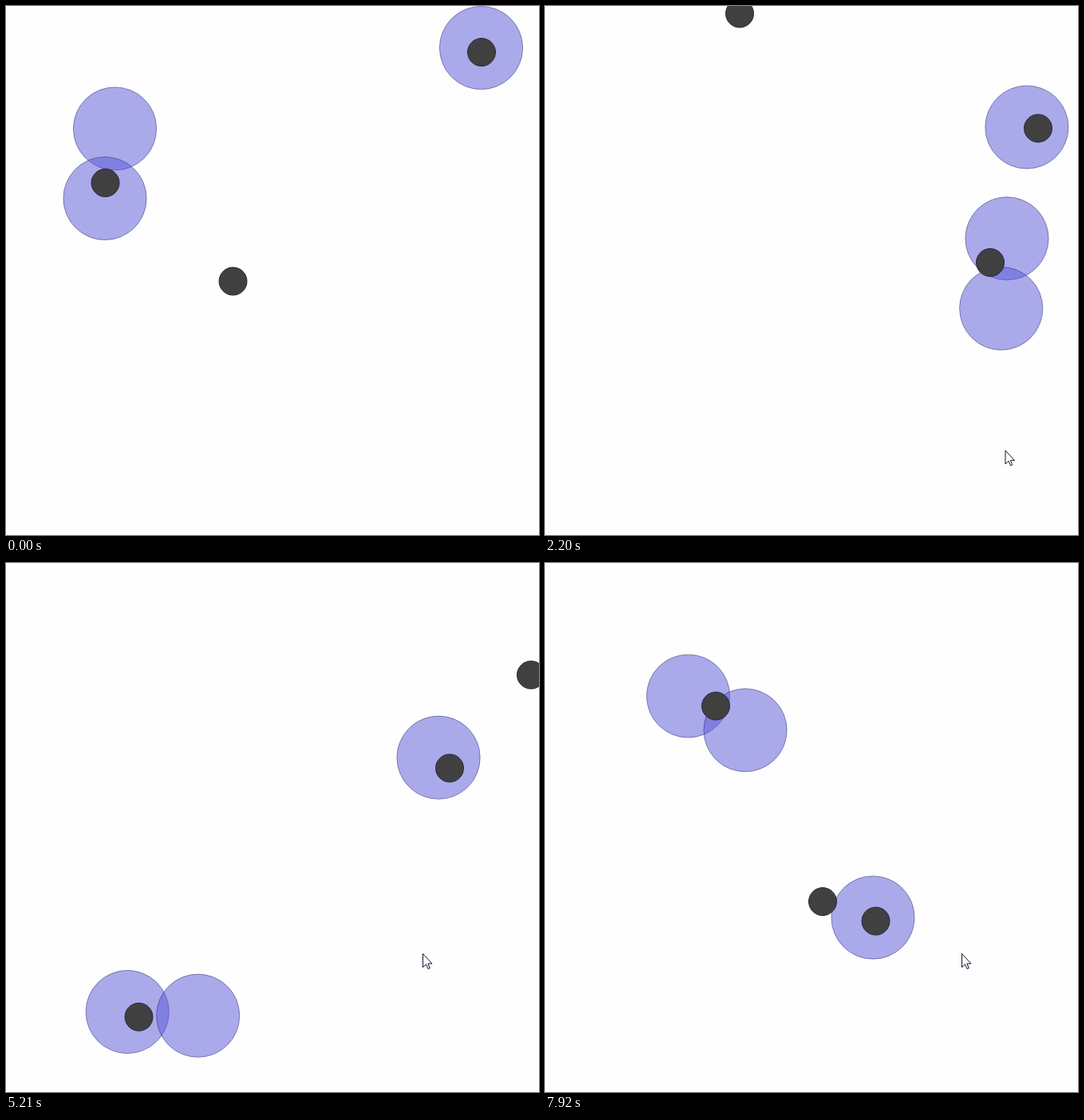
Animation, 668 px wide and 664 px high, one loop 7.99 s. Source, as an HTML page with a canvas:

```html
<!DOCTYPE html>
<html lang="en">
<head>
<meta charset="utf-8">
<title>Agents covering landmarks</title>
<style>
  html, body { margin: 0; width: 100%; height: 100%; overflow: hidden; background: #fefefe; }
  canvas { display: block; }
</style>
</head>
<body>
<canvas id="stage" width="668" height="664"></canvas>
<script>
const ctx = document.getElementById('stage').getContext('2d');
const LOOP = 7990, FRAMES = 115, STEP = LOOP / FRAMES;
const JITTER = 8, JITTER_MS = 200;

// Agents start at `begin`, reach their resting place at `settle` and drift until `end`.
// Each agent lists its start, resting place and place after the drift.
const episodes = [
  {
    begin: -800, settle: 0, end: 400,
    landmarks: [[596, 58], [124.5, 222], [284.5, 345.5]],
    agents: [[[136.5, 154]], [[124, 241.5]], [[595.5, 52.5]]]
  },
  {
    begin: 270, settle: 1240, end: 3040,
    landmarks: [[244, 9.5], [618, 153.5], [558, 322]],
    agents: [
      [[560, 40], [600, 154], [607, 150.5]],
      [[430, 120], [578.5, 288.5], [579.5, 294.5]],
      [[2, 640], [574, 379.8], [570, 379.8]]
    ]
  },
  {
    begin: 3540, settle: 4320, end: 6110,
    landmarks: [[658, 140.5], [556, 257.5], [166.5, 569.8]],
    agents: [
      [[84, 440], [166, 564.8], [151, 552.5]],
      [[420, 400], [258, 570.5], [238, 571.5]],
      [[480, 110], [542.5, 250.5], [545, 253.5]]
    ]
  },
  {
    begin: 6250, settle: 7010, end: 7920,
    landmarks: [[214, 179.5], [348, 425], [414.5, 449.5]],
    agents: [
      [[200, 390], [177.5, 179.5], [179.5, 167]],
      [[340, 430], [272, 201.3], [251, 209.8]],
      [[500, 596], [414.3, 432], [411, 445]]
    ]
  }
];

const mix = (a, b, u) => a.map((value, axis) => value + (b[axis] - value) * u);

// Smooth progress from 0 to 1 between two times
function ease(from, to, t) {
  const u = Math.min(Math.max((t - from) / (to - from), 0), 1);
  return u * u * (3 - 2 * u);
}

// Jitter returns to zero at both ends of the drift; each agent shakes along its own diagonal.
function agentAt([start, rest = start, last = rest], index, { begin, settle, end }, t) {
  if (t < settle) return mix(start, rest, ease(begin, settle, t));
  const waves = Math.round((end - settle) / JITTER_MS);
  const shake = JITTER * Math.sin(Math.PI * waves * (t - settle) / (end - settle)) ** 3;
  const [x, y] = mix(rest, last, ease(settle, end, t));
  return [x + shake * Math.cos(index + 2.5), y + shake * Math.sin(index + 2.5)];
}

function disc([x, y], radius, fill, stroke) {
  ctx.beginPath();
  ctx.arc(x, y, radius, 0, 2 * Math.PI);
  ctx.fillStyle = fill;
  ctx.fill();
  ctx.strokeStyle = stroke;
  ctx.stroke();
}

const arrow = new Path2D('M0 0V17L4 13.2L6.6 19L8.8 18L6.4 12.4H11.5Z');

function drawCursor(t) {
  const enter = ease(1060, 1300, t), cross = ease(1800, 2600, t), nudge = ease(3520, 3600, t);
  ctx.save();
  ctx.translate(646.5 - 7 * enter - 115 * cross - 2 * nudge,
    668.5 - 29 * enter - 150 * cross + nudge);
  ctx.fillStyle = '#fff';
  ctx.fill(arrow);
  ctx.strokeStyle = '#101030';
  ctx.stroke(arrow);
  ctx.restore();
}

function draw(time) {
  const t = Math.round(time / STEP) % FRAMES * STEP;
  const episode = episodes.findLast(e => e.begin <= t);
  ctx.fillStyle = '#fefefe';
  ctx.fillRect(0, 0, 668, 664);
  episode.agents.forEach((agent, index) =>
    disc(agentAt(agent, index, episode, t), 52.1, 'rgba(89,89,217,.5)', 'rgba(45,45,108,.5)'));
  for (const landmark of episode.landmarks) disc(landmark, 17.5, '#404040', '#28283c');
  drawCursor(t);
}

const start = performance.now();
function tick() {
  draw(performance.now() - start);
  requestAnimationFrame(tick);
}
tick();
</script>
</body>
</html>
```
